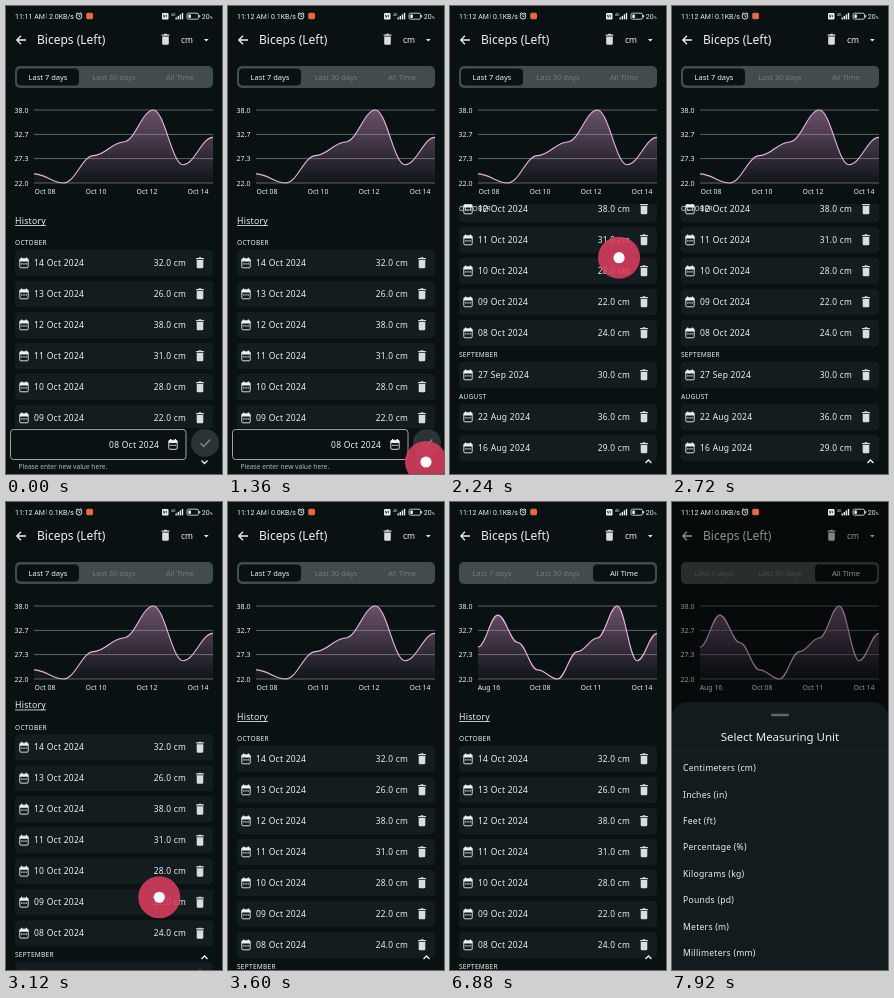
Animation of 216 by 468 pixels, one loop 8000 ms. Source, as an HTML page:

```html
<!DOCTYPE html>
<html lang="en">
<head>
<meta charset="utf-8">
<title>Measurement history</title>
<style>
  html, body { margin: 0; width: 100%; height: 100%; overflow: hidden; background: #0a1113; }
  svg { display: block; width: 100vw; height: 100vh; font-family: "Noto Sans", "Open Sans", sans-serif; }
  .status { font-family: Roboto, sans-serif; }
</style>
</head>
<body>
<svg id="stage" viewBox="0 0 216 468"></svg>
<script>
const LOOP = 8000;
const BG = '#0a1113', CARD = '#131c1f', INK = '#edf0f0', MUTED = '#727b7d';

// Markup helpers
const text = (x, y, str, size, attrs = '') =>
  `<text x="${x}" y="${y + size * 0.36}" font-size="${size}" fill="${INK}" ${attrs}>${str}</text>`;
const rect = (x, y, w, h, r, fill, attrs = '') =>
  `<rect x="${x}" y="${y}" width="${w}" height="${h}" rx="${r}" fill="${fill}" ${attrs}/>`;
const path = (d, attrs = '') => `<path d="${d}" ${attrs}/>`;
const stroke = (color, width) => `fill="none" stroke="${color}" stroke-width="${width}"`;
const at = (x, y, content, attrs = '') => `<g transform="translate(${x} ${y})" ${attrs}>${content}</g>`;
const middle = 'text-anchor="middle"', end = 'text-anchor="end"', spaced = 'letter-spacing=".25"';

const trash = (x, y) => at(x, y,
  path('M-3.9-5h2.2l.7-.7h2l.7.7h2.2v1.2h-7.8zM-3.3-3.1h6.6v7.2q0 1.2-1.2 1.2h-4.2q-1.2 0-1.2-1.2z', 'fill="#d9dddd"'));
const calendar = (x, y) => at(x, y,
  rect(-4.2, -4.2, 8.4, 9, 1, 'none', `stroke="${INK}" stroke-width=".9"`) +
  path('M-4.2-4.2h8.4v2.6h-8.4zM-3-5.6h1.2v2H-3zM1.8-5.6H3v2H1.8zM-2.8.2h1.3v1.3h-1.3zM-.65.2H.65v1.3H-.65zM1.5.2h1.3v1.3H1.5z',
    `fill="${INK}"`));
const chevron = (x, y, dir) =>
  at(x, y, path(`M-3 ${1.5 * dir}L0 ${-1.5 * dir}L3 ${1.5 * dir}`, stroke(INK, 1.3)));

// History list
const months = [
  ['OCTOBER', 'Oct', [[14, 32], [13, 26], [12, 38], [11, 31], [10, 28], [9, 22], [8, 24]]],
  ['SEPTEMBER', 'Sep', [[27, 30]]],
  ['AUGUST', 'Aug', [[22, 36], [16, 29]]],
];
const pad = n => String(n).padStart(2, '0');

function listMarkup() {
  let y = 237;
  let out = text(9, 215, 'History', 8.7, spaced) + rect(9, 219.2, 31, 0.8, 0, INK);
  months.forEach(([name, short, entries], i) => {
    if (i) out += text(9, y - 0.7, name, 6.6, spaced);
    y += 20;
    for (const [day, value] of entries) {
      out += rect(9, y - 13, 198, 26, 4, CARD) + calendar(18, y) +
        text(28, y, `${pad(day)} ${short} 2024`, 8.5, spaced) +
        text(180.2, y, `${value.toFixed(1)} cm`, 8.4, `${end} ${spaced}`) + trash(194, y);
      y += 31;
    }
    y -= 9;
  });
  return out;
}

// Tabs with their charts
const tabs = ['Last 7 days', 'Last 30 days', 'All Time'];
const history = [29, 36, 30, 24, 22, 28, 31, 38, 26, 32];
const charts = [
  [history.slice(3), ['Oct 08', 'Oct 10', 'Oct 12', 'Oct 14']],
  [history.slice(2), ['Sep 27', 'Oct 09', 'Oct 12', 'Oct 14']],
  [history, ['Aug 16', 'Oct 08', 'Oct 11', 'Oct 14']],
];

function curve(values) {
  const step = 179 / (values.length - 1), reach = step * 0.38;
  const yOf = v => 177 - (v - 22) / 16 * 73;
  return values.map((v, i) => {
    const x = 28 + i * step, y = yOf(v);
    if (!i) return `M${x} ${y}`;
    return `C${x - step + reach} ${yOf(values[i - 1])} ${x - reach} ${y} ${x} ${y}`;
  }).join('');
}

function viewMarkup([values, dates], active) {
  const line = curve(values);
  return `<g class="view">` +
    rect(11 + active * 66, 62.5, 62, 17, 4, BG) +
    tabs.map((label, i) => text(42 + i * 66, 71, label, 7.5,
      `${middle} style="${i === active ? 'font-weight:500' : `fill:${MUTED}`}"`)).join('') +
    path(line + 'L207 177H28Z', 'fill="url(#area)"') +
    path(line, stroke('#e9b5e2', 1.1)) +
    dates.map((d, i) => text(39 + i * 51, 185.5, d, 6.9, `${middle} font-weight="500"`)).join('') + '</g>';
}

const grid = [38, 32.7, 27.3, 22].map((v, i) => {
  const y = 104 + i * 24.33;
  return text(22.5, y, v.toFixed(1), 7, end) + rect(28, y - 0.4, 179, 0.8, 0, '#70777a');
}).join('');

const header =
  path('M20 34H11M15 29.8L10.8 34L15 38.2', stroke(INK, 1.3)) +
  text(31, 34, 'Biceps (Left)', 12) + trash(159.5, 33.5) +
  text(175, 34, 'cm', 8.5) + path('M198 32.9h4.6l-2.3 2.5z', `fill="${INK}"`) +
  rect(9, 60, 198, 22, 5, '#424b4d');

const panel =
  rect(0, 422, 216, 46, 0, BG) +
  rect(4.5, 423.5, 175.5, 30, 3, BG, 'stroke="#aeb4b5" stroke-width=".9"') +
  text(153.2, 438.5, '08 Oct 2024', 8.5, `${end} ${spaced}`) + calendar(167, 438.5) +
  text(12.5, 461, 'Please enter new value here.', 6.6, 'style="fill:#b4babb"') +
  '<circle cx="199" cy="437" r="14" fill="#2b3335"/>' +
  path('M194.5 437.2l3.2 3.2l6.6-7', stroke('#7f888a', 1.4)) + chevron(198.5, 456, -1);

const units = ['Centimeters (cm)', 'Inches (in)', 'Feet (ft)', 'Percentage (%)',
  'Kilograms (kg)', 'Pounds (pd)', 'Meters (m)', 'Millimeters (mm)'];
const sheet =
  rect(0, 200, 216, 300, 15, '#121b1e') + rect(99, 211.8, 18, 2.4, 1.2, '#60686a') +
  text(108, 234.5, 'Select Measuring Unit', 11.5, middle) +
  rect(0, 247.6, 216, 0.8, 0, '#1f292c') +
  units.map((unit, i) => text(11, 266 + i * 26.45, unit, 8.6, spaced)).join('');

const status =
  text(9, 10, '', 7, 'id="clock"') + rect(40.3, 7.5, 0.6, 5, 0, '#8b9294') +
  text(43, 10, '', 7, 'id="speed"') +
  `<circle cx="73" cy="10.3" r="2.8" ${stroke(INK, 0.9)}/>` +
  path('M73 8.7v1.8h1.3M69.8 8l1.8-1.5M76.2 8l-1.8-1.5', stroke(INK, 0.8)) +
  rect(80.2, 6.8, 6.8, 6.4, 1.6, '#e9673b') +
  rect(156, 7, 6.5, 6.5, 1, INK) + path('M157.2 8.7l1 2.8l1-2.8M160.4 8.8v2.6', stroke(BG, 0.7)) +
  text(165, 8.3, '4G', 3.6) +
  [0, 1, 2, 3].map(i => rect(169.5 + i * 2.1, 11.4 - i * 1.5, 1.4, 2 + i * 1.5, 0, INK)).join('') +
  rect(181, 7.2, 11.5, 6, 1.6, 'none', `stroke="${INK}" stroke-width=".8"`) +
  rect(182.3, 8.5, 2.6, 3.4, 0.6, INK) + rect(193.2, 9, 1, 2.4, 0.4, INK) +
  text(195.8, 10, '20', 7) + text(203.7, 11, '%', 4.2);

const stage = document.getElementById('stage');
stage.innerHTML = `
  <defs>
    <linearGradient id="area" gradientUnits="userSpaceOnUse" x1="0" y1="104" x2="0" y2="177">
      <stop stop-color="#b583ae" stop-opacity=".56"/>
      <stop offset="1" stop-color="#b583ae" stop-opacity=".04"/>
    </linearGradient>
    <clipPath id="viewport"><rect y="198" width="216" height="270"/></clipPath>
  </defs>
  ${rect(0, 0, 216, 468, 0, BG)}
  <g clip-path="url(#viewport)">
    <g id="list">${listMarkup()}</g>
    <g id="sticky">${text(9, 0, months[0][0], 6.6, spaced)}</g>
  </g>
  ${header}${grid}${charts.map(viewMarkup).join('')}
  <g id="expand">${chevron(198.5, 455.5, 1)}</g>
  <g id="panel">${panel}</g>
  <rect id="dim" width="216" height="468"/>
  <g id="sheet">${sheet}</g>
  <g class="status">${status}</g>
  <g id="touch"><circle r="21" fill="#da3e5f" opacity=".88"/><circle r="5.6" fill="#fff"/></g>`;

const part = Object.fromEntries([...stage.querySelectorAll('[id]')].map(el => [el.id, el]));
const views = stage.querySelectorAll('.view');

// Motion
const progress = (t, from, to) => Math.min(1, Math.max(0, (t - from) / (to - from)));
const mix = (a, b, p) => a + (b - a) * p;
const easeOut = p => 1 - (1 - p) ** 3;
const easeInOut = p => p * p * (3 - 2 * p);
const move = (el, x, y) => el.setAttribute('transform', `translate(${x} ${y})`);

// start time, network speed
const speeds = [[0, '2.0'], [1360, '0.1'], [3360, '0.0'], [5280, '0.1'], [7440, '0.0']];

// start, end, fade time, start point, end point
const touches = [
  [1350, 1500, 150, [198, 456]],
  [2000, 2470, 160, [147, 385], [190, 125]],
  [2870, 3200, 160, [170, 253], [148, 440]],
  [4155, 4230, 1, [108, 71]],
  [4700, 4860, 180, [180, 68]],
  [7430, 7540, 150, [186, 34]],
];

function render(t) {
  part.clock.textContent = t < 480 ? '11:11 AM' : '11:12 AM';
  part.speed.textContent = speeds.findLast(([from]) => t >= from)[1] + 'KB/s';

  const scroll = 116 * (progress(t, 2030, 2235) - progress(t, 2915, 3144));
  move(part.list, 0, -scroll);
  move(part.sticky, 0, Math.max(237 - scroll, 203));

  const active = t < 4160 ? 0 : t < 4720 ? 1 : 2;
  views.forEach((view, i) => { view.style.display = i === active ? '' : 'none'; });

  const collapse = easeInOut(progress(t, 1420, 1680));
  move(part.panel, 0, 48 * collapse);
  part.expand.style.opacity = collapse;

  const rise = easeOut(progress(t, 7510, 7850));
  move(part.sheet, 0, 270 * (1 - rise));
  part.dim.style.opacity = 0.4 * rise;

  const touch = touches.find(([from, to, fade]) => t >= from && t < to + fade);
  part.touch.style.display = touch ? '' : 'none';
  if (touch) {
    const [from, to, fade, a, b = a] = touch;
    const p = progress(t, from, to);
    move(part.touch, mix(a[0], b[0], p), mix(a[1], b[1], p));
    part.touch.style.opacity = 1 - progress(t, to, to + fade);
  }
}

function tick() {
  render(performance.now() % LOOP);
  requestAnimationFrame(tick);
}
tick();
</script>
</body>
</html>
```
